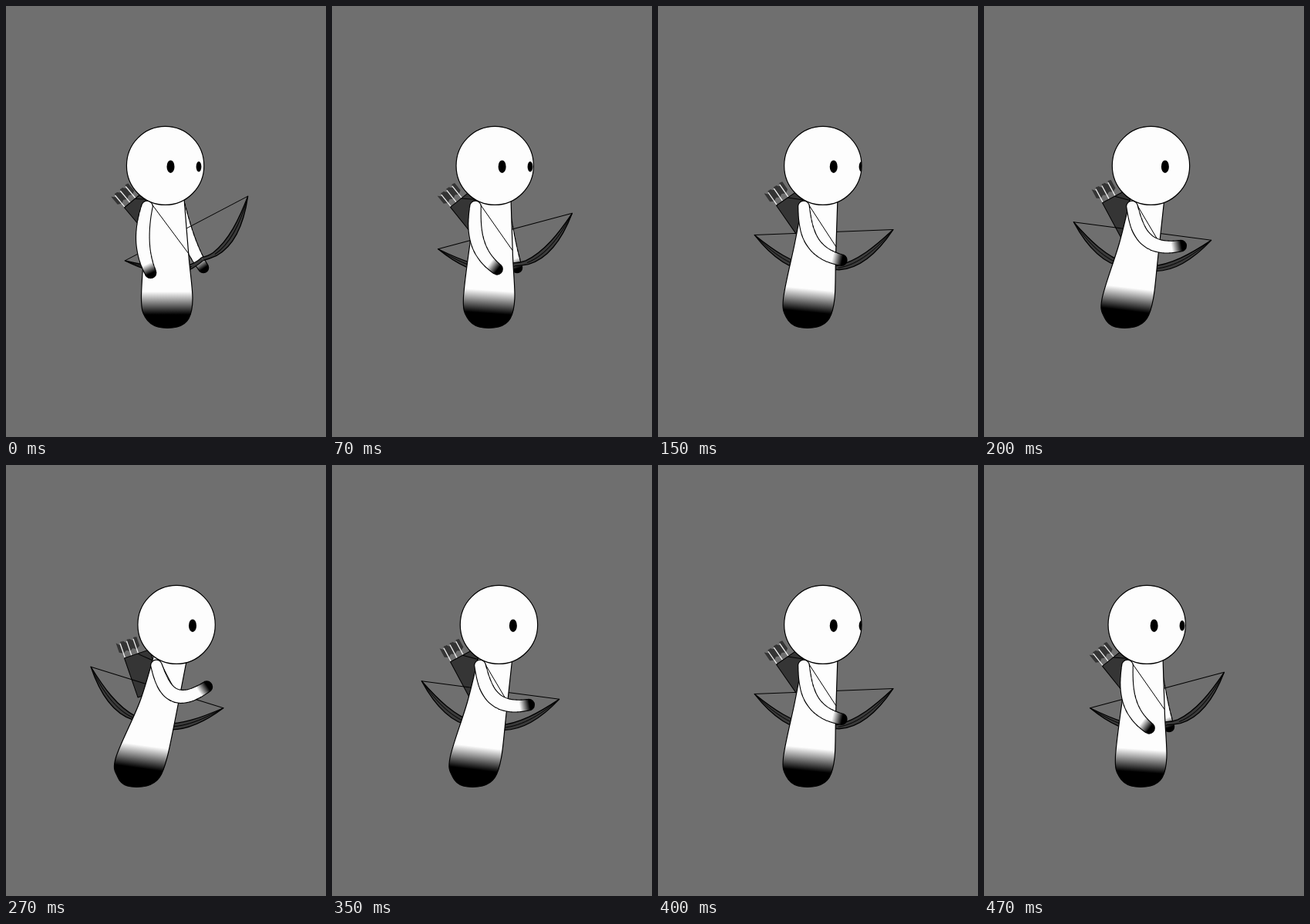
Write an HTML page with a canvas that moves like this. It is 415x560 px and loops after 0.6 s.

```html
<!DOCTYPE html>
<html lang="en">
<head>
<meta charset="utf-8">
<title>Archer turn</title>
<style>
html, body { margin: 0; width: 100%; height: 100%; overflow: hidden; background: #6f6f6f; }
canvas { display: block; }
</style>
</head>
<body>
<canvas id="stage" width="415" height="560"></canvas>
<script>
const ctx = document.getElementById('stage').getContext('2d');
const WHITE = '#fdfdfd', DARK = '#353535', BLACK = '#000';
const RAD = Math.PI / 180;

// the turn goes out in four steps and back in four
const holds = [70, 80, 50, 70, 80, 50, 70, 130];
const loop = holds.reduce((a, b) => a + b);

function turnAt(t) {
  let step = 0;
  while (t >= holds[step]) t -= holds[step++];
  return 1 - Math.abs(1 - step / 4);
}

function paint(path, fill, width = 1.2) {
  if (fill) { ctx.fillStyle = fill; ctx.fill(path); }
  ctx.strokeStyle = BLACK;
  ctx.lineWidth = width;
  ctx.stroke(path);
}

function polygon(points) {
  const path = new Path2D();
  points.forEach(([x, y]) => path.lineTo(x, y));
  path.closePath();
  return path;
}

function line(x1, y1, x2, y2, color = BLACK, width = 1) {
  ctx.strokeStyle = color;
  ctx.lineWidth = width;
  ctx.beginPath();
  ctx.moveTo(x1, y1);
  ctx.lineTo(x2, y2);
  ctx.stroke();
}

function ellipse(x, y, rx, ry) {
  const path = new Path2D();
  path.ellipse(x, y, rx, ry, 0, 0, Math.PI * 2);
  return path;
}

function placed(x, y, degrees, draw) {
  ctx.save();
  ctx.translate(x, y);
  ctx.rotate(degrees * RAD);
  draw();
  ctx.restore();
}

function fade(x1, y1, x2, y2) {
  const g = ctx.createLinearGradient(x1, y1, x2, y2);
  g.addColorStop(0, WHITE);
  g.addColorStop(1, BLACK);
  return g;
}

function spline(points) {
  const at = i => points[Math.max(0, Math.min(points.length - 1, i))];
  const path = new Path2D();
  path.moveTo(...at(0));
  for (let i = 0; i < points.length - 1; i++) {
    const [a, b, c, d] = [at(i - 1), at(i), at(i + 1), at(i + 2)];
    path.bezierCurveTo(
      b[0] + (c[0] - a[0]) / 6, b[1] + (c[1] - a[1]) / 6,
      c[0] - (d[0] - b[0]) / 6, c[1] - (d[1] - b[1]) / 6, ...c);
  }
  return path;
}

// a tube around a cubic curve, darkening at the hand
function limb(p0, p1, p2, p3, r) {
  const path = new Path2D();
  const count = 70;
  for (let i = 0; i <= count; i++) {
    const t = i / count, s = 1 - t;
    const [x, y] = [0, 1].map(k =>
      s ** 3 * p0[k] + 3 * s * s * t * p1[k] + 3 * s * t * t * p2[k] + t ** 3 * p3[k]);
    const radius = r + 1.5 * Math.sin(Math.PI * t);
    path.moveTo(x + radius, y);
    path.arc(x, y, radius, 0, Math.PI * 2);
  }
  const dx = p3[0] - p2[0], dy = p3[1] - p2[1], len = Math.hypot(dx, dy);
  const ux = dx / len, uy = dy / len;
  paint(path, null, 2.2);
  ctx.fillStyle = fade(p3[0] - ux * 12, p3[1] - uy * 12, p3[0] + ux, p3[1] + uy);
  ctx.fill(path);
}

function nearArm(q) {
  const angle = (3 + 64 * q) * RAD;
  const reach = 86 - 15 * q ** 4;
  const x = 183 + 12 * q, y = 260.5;
  const point = (along, sag) => [
    x + Math.sin(angle) * reach * along - Math.cos(angle) * sag,
    y + Math.cos(angle) * reach * along + Math.sin(angle) * sag
  ];
  limb(point(0, 0), point(0.33 - 0.1 * q, 9 + 10 * q),
    point(0.66 - 0.1 * q, 12 + 36 * q), point(1, 0), 6.8);
}

function farArm(q) {
  const x = 225 - 10 * q, dx = 31 - 54 * q;
  limb([x, 257], [x + dx * 0.2, 287], [x + dx * 0.4, 312], [x + dx, 340], 6.2);
}

function quiver() {
  const fletch = [[-5, -22], [-1, -18], [1, -22], [5, -21], [5, -9], [0, -6], [-5, -9]];
  for (let u = 1; u < 20; u += 9) {
    ctx.fillStyle = DARK;
    ctx.fill(polygon(fletch.map(([x, y]) => [x + u, y])));
    line(u, -20, u, 0, '#f0f0f0', 1.3);
  }
  paint(polygon([[0, 0], [35, 0], [31, 54], [0, 54]]), DARK, 1);
  line(18, 0, 33, 14);
}

function bow() {
  line(-90, 0, 90, 0);
  for (const k of [-1, 1]) {
    const half = new Path2D();
    half.moveTo(0, 47);
    half.quadraticCurveTo(8 * k, 49, 18 * k, 49.5);
    half.bezierCurveTo(45 * k, 49, 69 * k, 29, 90 * k, 0);
    half.bezierCurveTo(66 * k, 21, 42 * k, 39, 16 * k, 44);
    half.quadraticCurveTo(8 * k, 45, 0, 42.5);
    paint(half, '#3a3a3a', 1.3);
    const rib = new Path2D();
    rib.moveTo(90 * k, 0);
    rib.bezierCurveTo(67 * k, 25, 43 * k, 44, 17 * k, 47);
    paint(rib, null, 0.9);
  }
}

function torso(q) {
  const lean = 33 * q ** 1.35;
  // x, y and how far the point follows the lean
  const outline = [
    [186 + 5 * q, 250, 0], [180, 308, 0.2], [175.5, 380, 1], [181, 405, 1.1], [197, 417, 1.2],
    [222, 417, 1.2], [237, 406, 1.15], [242, 380, 1], [237, 325, 0.5], [231 + 4 * q, 250, 0]
  ].map(([x, y, sway]) => [x - lean * sway, y]);
  const tilt = 8 * Math.sqrt(q) * RAD;
  const cx = 208.7 - lean, cy = 386 - 7 * q;
  const dx = -15 * Math.sin(tilt), dy = 15 * Math.cos(tilt);
  paint(spline(outline), fade(cx - dx, cy - dy, cx + dx, cy + dy));
  line(188 + 12 * q, 256, 237 - 12 * q, 322 - 18 * q);
}

function face(q) {
  const skull = ellipse(206.6 + 14.5 * q + Math.sin(2 * Math.PI * q), 207.4, 50.2, 51);
  paint(skull, WHITE);
  ctx.save();
  ctx.clip(skull);
  ctx.fillStyle = BLACK;
  ctx.fill(ellipse(213.5 + 28.5 * q, 208.7, 5, 8.3));
  ctx.fill(ellipse(250 + 28 * q, 208.7, 3.4, 6.7));
  ctx.restore();
}

function draw(q) {
  const swell = Math.sin(Math.PI * q);
  ctx.fillStyle = '#6f6f6f';
  ctx.fillRect(0, 0, 415, 560);
  placed(153.5, 262 - 11 * q * q, 21 * q * q - 40, quiver);
  farArm(q);
  placed(234 - 38 * q, 289 + 5 * swell, 45 * q - 27.7 + 3 * swell * swell, bow);
  torso(q);
  nearArm(q);
  face(q);
}

function tick() {
  draw(turnAt(performance.now() % loop));
  requestAnimationFrame(tick);
}
ctx.lineJoin = 'round';
tick();
</script>
</body>
</html>
```
